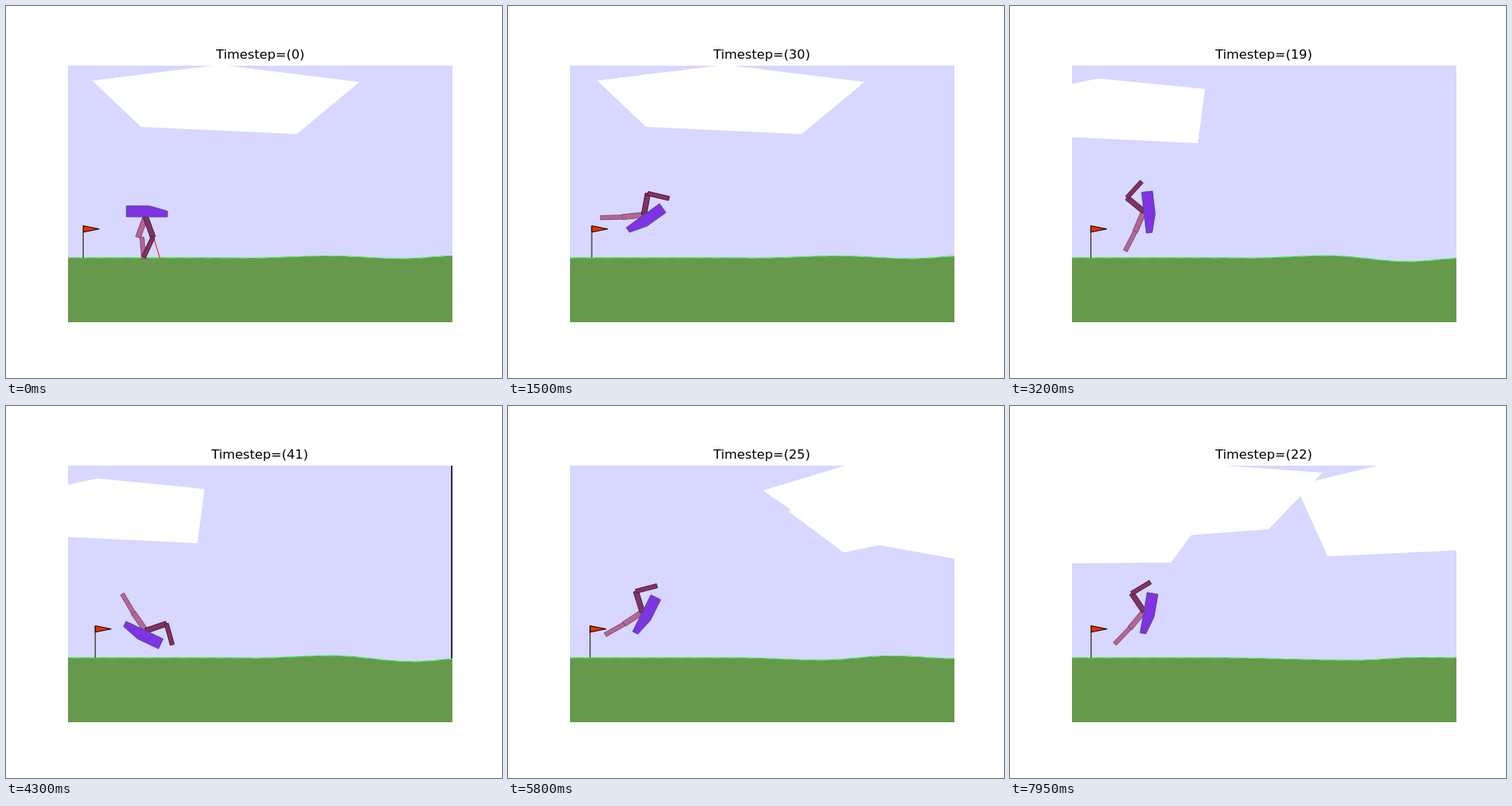
An HTML page with a canvas for the animation above (8000 ms loop, 640 by 480 pixels).

```html
<!DOCTYPE html>
<html lang="en">
<head>
<meta charset="utf-8">
<title>Walker</title>
<style>
html, body { margin: 0; width: 100%; height: 100%; overflow: hidden; background: #fff; }
canvas { display: block; }
</style>
</head>
<body>
<canvas id="stage" width="640" height="480"></canvas>
<script>
const ctx = document.getElementById('stage').getContext('2d');
const { min, max, sin, cos, sqrt, round, PI } = Math;
const STEP_MS = 50, STEPS = 160, SCALE = 496 / 600, RAD = PI / 180;
const VIEW = { x: 80, y: 77, w: 496, h: 331 };
const SKY = 'rgb(215,215,255)', GROUND = 324.9, TILE = 14 * SCALE;

// hills: turning points of the ground as [x, height below the flat start]
const EPISODES = [
  { start: 0, push: 0, firstRay: 2,
    cloud: [[111, 96.3], [276, 75.8], [456, 98], [375, 165.3], [174, 156]],
    hills: [[310, 0.4], [418, -2.3], [513, 1.2], [580, -2.5]] },
  { start: 45, push: 0.04, firstRay: 1,
    cloud: [[33, 110], [111.4, 93.5], [249.4, 107], [240.4, 177], [33, 167]],
    hills: [[305, 0.4], [404, -2.7], [510, 5], [580, 0.5]] },
  { start: 91, push: 0, firstRay: 1,
    cloud: [[326, 109], [465, 67], [610, 67], [610, 204], [573, 197], [476, 179.5],
            [430, 189], [359, 136], [362, 134]],
    hills: [[285, 0], [399, 3], [488, -2.5], [570, 1]] },
  { start: 137, push: 0, firstRay: 1,
    cloud: [[50, 203.3], [205.5, 202], [231.5, 166.5], [331.5, 159], [372.5, 116], [407.5, 194],
            [610, 184.5], [610, 67], [50, 67]],
    gap: [[262, 76], [400.5, 86], [390.5, 96.5], [476, 76]],
    hills: [[255, 0], [441, 3.2], [522, -0.4], [580, 0]] },
];

// The hull pitches over at a steady rate while each joint motor turns to its limit.
function poseAt(t) {
  const late = max(0, t - 4);
  return {
    scroll: -0.225 * min(t, 4) + 0.27 * late + 0.0035 * late ** 2,
    lag: min(0.4, 0.2 * t - 0.4) + 4.2 * (t / 44) ** 12,
    y: 265.4 - 0.2 * t + 0.043 * max(0, t - 11) ** 2,
    tilt: 5.55 * (t - 4 + sqrt((t - 4) ** 2 + 0.4)) / 2,
    darkHip: max(-46, 20 - 4.6 * t),
    darkKnee: max(-93, -45 - 6 * t),
    lightHip: min(60, -20 + 7.7 * t),
    lightKnee: max(25 - 16 * t, min(-4, -66 + 6.9 * t)),
    kneeGap: max(0, 5 - 5 * t),
  };
}

function trace(points) {
  ctx.beginPath();
  points.forEach(([x, y]) => ctx.lineTo(x, y));
}

function line(points, color) {
  trace(points);
  ctx.strokeStyle = color;
  ctx.stroke();
}

function polygon(points, fill, stroke) {
  trace(points);
  ctx.closePath();
  ctx.fillStyle = fill;
  ctx.fill();
  if (!stroke) return;
  ctx.strokeStyle = stroke;
  ctx.stroke();
}

const shift = (points, dx) => points.map(([x, y]) => [x + dx, y]);

// Draws one limb hanging from a joint and returns its far end.
function limb([x, y], angle, width, fill, stroke) {
  const length = 34 * SCALE, s = sin(angle * RAD), c = cos(angle * RAD);
  const at = (across, along) => [x + across * c + along * s, y - across * s + along * c];
  const w = width * SCALE / 2;
  polygon([at(-w, 0), at(w, 0), at(w, length), at(-w, length)], fill, stroke);
  return at(0, length);
}

function leg(hip, upper, knee, gap, fill, stroke) {
  const [x, y] = limb(hip, upper, 8, fill, stroke);
  limb([x + gap, y], upper + knee, 6.4, fill, stroke);
}

function groundAt(x, hills) {
  const i = hills.findIndex(h => h[0] > x);
  if (i < 0) return GROUND + hills.at(-1)[1];
  const [x1, h1] = hills[i], [x0, h0] = hills[i - 1] || [0, 0];
  const ease = i ? (1 - cos(PI * (x - x0) / (x1 - x0))) / 2 : ((x / x1) ** 12);
  return GROUND + h0 + (h1 - h0) * ease;
}

function ground(hills, dx) {
  const edge = [];
  for (let x = 4 * TILE; x < 620; x += TILE) edge.push([x + dx, groundAt(x, hills)]);
  polygon([...edge, [640, 420], [40, 420]], 'rgb(102,153,76)');
  line(edge, 'rgb(76,204,76)');
  ctx.setLineDash([TILE, TILE]);
  line(edge, 'rgb(76,255,76)');
  ctx.setLineDash([]);
}

// The sensor shows one of its ten rays per step, sweeping out and back once.
function ray(x, y, n) {
  if (n >= 20) return;
  const a = 0.15 * min(n, 19 - n);
  const reach = min(160 * SCALE, (GROUND - y) / cos(a));
  line([[x, y], [x + reach * sin(a), y + reach * cos(a)]], 'rgb(255,0,0)');
}

function flag(x) {
  const top = GROUND - 50 * SCALE;
  line([[x, top], [x, GROUND]], '#000');
  polygon([[x, top], [x, top + 10 * SCALE], [x + 25 * SCALE, top + 5 * SCALE]], 'rgb(230,51,0)', '#000');
}

function walker(x, pose) {
  const s = sin(pose.tilt * RAD), c = cos(pose.tilt * RAD);
  const onHull = ([u, v]) => [x + (u * c + v * s) * SCALE, pose.y + (u * s - v * c) * SCALE];
  const hip = onHull([0, -8]);
  leg(hip, pose.lightHip - pose.tilt, pose.lightKnee, pose.kneeGap, 'rgb(178,102,153)', 'rgb(127,76,102)');
  leg(hip, pose.darkHip - pose.tilt, pose.darkKnee, 0, 'rgb(127,51,102)', 'rgb(76,25,51)');
  polygon([[-30, 9], [6, 9], [34, 1], [34, -8], [-30, -8]].map(onHull), 'rgb(127,51,229)', 'rgb(76,76,127)');
}

function title(text) {
  ctx.fillStyle = '#000';
  ctx.font = '16.667px "DejaVu Sans", sans-serif';
  const box = ctx.measureText(text);
  const ink = box.actualBoundingBoxLeft + box.actualBoundingBoxRight;
  ctx.fillText(text, round(VIEW.x + VIEW.w / 2 - ink / 2), 68);
}

function draw(index) {
  const episode = EPISODES.findLast(e => e.start <= index);
  const step = index - episode.start;
  const pose = poseAt(step);
  const scroll = pose.scroll + episode.push * step;
  const cloudShift = (scroll - pose.lag) / 2;
  const x = 179.7 - pose.lag;

  ctx.fillStyle = '#fff';
  ctx.fillRect(0, 0, 640, 480);
  title(`Timestep=(${step})`);

  ctx.save();
  ctx.beginPath();
  ctx.rect(VIEW.x, VIEW.y, VIEW.w, VIEW.h);
  ctx.clip();
  ctx.lineWidth = 1;
  ctx.fillStyle = SKY;
  ctx.fillRect(VIEW.x, VIEW.y, VIEW.w, VIEW.h);
  polygon(shift(episode.cloud, cloudShift), '#fff');
  if (episode.gap) polygon(shift(episode.gap, cloudShift), SKY);

  // The sky trails the camera and leaves a bare strip at the right.
  const bare = max(0, pose.lag - 0.6);
  ctx.fillStyle = '#000';
  ctx.fillRect(VIEW.x + VIEW.w - bare, VIEW.y, bare, VIEW.h);

  ground(episode.hills, scroll);
  ray(x, pose.y, step + episode.firstRay);
  walker(x, pose);
  flag(99.6 + scroll);
  ctx.restore();
}

const origin = performance.now();
function tick() {
  draw(Math.floor((performance.now() - origin) / STEP_MS) % STEPS);
  requestAnimationFrame(tick);
}
tick();
</script>
</body>
</html>
```
